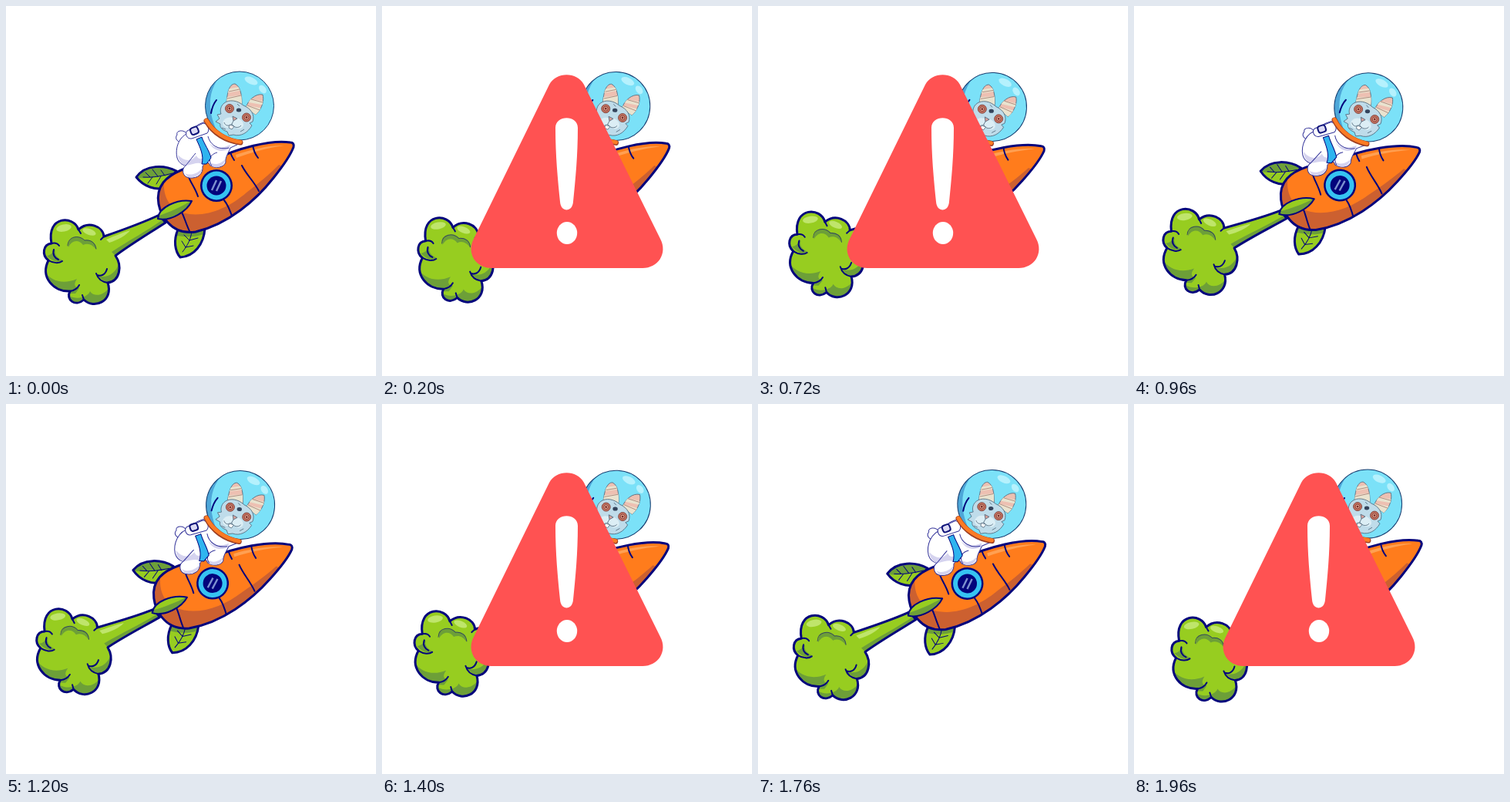
Animation of 480 by 480 pixels, one loop 2 s. Source, as an HTML page:

```html
<!DOCTYPE html>
<html lang="en">
<head>
<meta charset="utf-8">
<title>Carrot rocket</title>
<style>
  html, body { margin: 0; width: 100%; height: 100%; overflow: hidden; background: #fff; }
  svg { display: block; width: 100vw; height: 100vh; }
  .line { fill: none; stroke: #03047c; stroke-linecap: round; stroke-linejoin: round; }
  .w3 { stroke-width: 3; }
  .w2 { stroke-width: 2; }
  .w1 { stroke-width: 1; }
  .green { fill: #97cd20; }
  .shade { fill: #6d9f38; }
  .shine { fill: #bfe56b; }
  .fur { stroke: #4c6478; stroke-width: .8; stroke-linejoin: round; }
</style>
</head>
<body>
<svg viewBox="0 0 480 480">
  <defs>
    <path id="puff" d="M127 299 C126 286 107 278 94 290 C88 271 52 272 59 308 C48 309 46 323 55 330 C44 352 62 371 83 370 C77 381 90 391 101 381 C114 394 140 383 132 359 C148 357 151 337 142 324 C162 309 184 296 207 281 L199 271 C178 281 150 291 127 299Z"/>
    <path id="hull" d="M369 177 C344 173 301 184 263 202 C238 208 215 215 204 229 C191 246 199 269 210 281 C220 292 232 295 246 293 C289 283 325 251 347 223 C359 208 369 194 373 183 C374 179 372 177 369 177Z"/>
    <path id="leafA" d="M221 214 C206 206 181 205 169 222 C179 235 195 239 205 236Z"/>
    <path id="leafB" d="M223 290 C217 304 219 318 226 326 C244 325 257 309 258 288Z"/>
    <path id="nozzle" d="M197 276 C198 261 222 250 241 253 C235 266 214 280 197 276Z"/>
    <clipPath id="inPuff"><use href="#puff"/></clipPath>
    <clipPath id="inHull"><use href="#hull"/></clipPath>
    <clipPath id="inLeafA"><use href="#leafA"/></clipPath>
    <clipPath id="inLeafB"><use href="#leafB"/></clipPath>
    <clipPath id="inNozzle"><use href="#nozzle"/></clipPath>
    <clipPath id="inHelmet"><circle id="helmet" cx="303" cy="129.500" r="44.500"/></clipPath>
    <clipPath id="inEarA"><path id="earA" d="M286 125 C287 114 289 101 297 101 C304 104 306 115 306 127Z"/></clipPath>
    <clipPath id="inEarB"><path id="earB" d="M311 132 C314 122 324 113 333 115 C335 121 333 133 324 141Z"/></clipPath>
  </defs>

  <g id="ship">
    <!-- exhaust -->
    <use href="#puff" class="green"/>
    <g clip-path="url(#inPuff)">
      <path class="shade" d="M48 342 C57 357 74 362 92 354 C88 360 88 365 95 366 L90 373 H50Z"/>
      <path class="shade" d="M82 376 C93 382 107 377 109 370 C114 378 127 376 134 365 L140 392 H82Z"/>
      <path class="shade" d="M119 350 C132 354 143 346 147 333 L155 350 L133 362Z"/>
      <path class="shade" d="M137 319 C161 303 181 293 205 276 L215 286 L146 328Z"/>
      <path class="shade" d="M53 324 C59 331 69 334 74 330 C68 328 62 323 64 316 C61 320 57 324 53 324Z"/>
      <path class="shade" d="M81 313 C79 300 93 295 102 304 C110 302 117 308 117 316 C112 309 106 307 100 310 C94 302 85 304 81 313Z"/>
      <ellipse class="shine" cx="75" cy="288" rx="10" ry="4.500" transform="rotate(-12 75 288)"/>
      <ellipse class="shine" cx="108" cy="293" rx="9" ry="4" transform="rotate(20 108 293)"/>
      <path class="shine" d="M130 303 C139 299 151 294 161 291 C157 297 144 304 134 307Z"/>
    </g>
    <use href="#puff" class="line w3"/>
    <path class="line w2" d="M55 330 C62 334 69 334 73 331 M59 308 C63 307 67 308 69 311 M62 316 C60 322 63 327 68 329 M94 290 L97 295 M83 370 C89 369 93 366 95 362 M101 381 L99 375 M132 359 C124 358 119 353 117 347 M131 341 C129 349 123 351 118 349 M127 299 L123 303"/>
    <path class="line w1" stroke-opacity=".6" d="M80 311 C80 299 94 296 102 304 C110 303 116 307 117 315"/>

    <!-- leaves -->
    <use href="#leafA" class="green"/>
    <path class="shade" clip-path="url(#inLeafA)" d="M168 223 C182 224 202 221 222 218 V200 H168Z"/>
    <use href="#leafA" class="line w3"/>
    <path class="line w1" d="M178 222 C192 223 204 220 216 217 M187 222 L181 216 M197 221 L190 212 M206 220 L201 213 M190 222 L184 230 M201 221 L195 231"/>
    <use href="#leafB" class="green"/>
    <path class="shade" clip-path="url(#inLeafB)" d="M218 286 H262 V294 C247 300 234 301 218 297Z"/>
    <use href="#leafB" class="line w3"/>
    <path class="line w1" d="M229 319 C236 310 240 302 241 292 M233 313 L228 305 M238 304 L231 297 M233 313 L243 311 M238 304 L249 301"/>

    <!-- carrot -->
    <use href="#hull" fill="#ff7c1c"/>
    <g clip-path="url(#inHull)">
      <path fill="#cc6030" d="M205 226 C203 249 214 267 238 270 C263 273 290 261 312 242 C329 229 341 219 354 206 L365 210 L300 300 H190 V226Z"/>
      <path fill="#ffa052" d="M298 193 C318 186 343 180 361 181 C339 184 318 190 299 197Z"/>
      <path class="line w2" d="M320 180 C321 187 323 192 327 197 M291 190 C292 193 294 197 296 200 M306 207 C312 219 322 228 328 240 M283 252 C288 258 291 266 294 275 M236 219 C239 229 245 235 249 247 M222 258 C230 267 231 277 238 292"/>
    </g>
    <use href="#hull" class="line w3"/>

    <!-- window -->
    <circle cx="273" cy="233" r="21" fill="#03047c"/>
    <circle cx="273" cy="233" r="18.500" fill="#36c3f2"/>
    <circle cx="273" cy="233" r="12.500" fill="#03047c"/>
    <path fill="none" stroke="#7d91cf" stroke-width="2.400" d="M267 239 L273 226 M273 240 L279 227"/>

    <!-- nozzle -->
    <use href="#nozzle" class="green"/>
    <path class="shade" clip-path="url(#inNozzle)" d="M195 273 C212 268 226 261 242 252 L240 285 H195Z"/>
    <use href="#nozzle" class="line w2"/>

    <!-- suit -->
    <g stroke="#34349a" stroke-width="1" stroke-linejoin="round">
      <path fill="#fff" d="M231 177 C223 178 218 172 222 167 C220 162 230 159 235 166Z"/>
      <path fill="#fff" d="M239 164 C224 168 219 185 222 197 C224 203 228 206 233 207 C227 212 229 222 238 223 C249 224 256 218 255 208 C259 201 263 202 265 207 C272 211 282 210 285 203 C284 196 289 190 291 184 L304 178 L262 150 C252 151 244 156 239 164Z"/>
      <path fill="#d5d3ef" stroke="none" d="M223 193 C231 202 241 202 247 194 C250 201 257 199 261 192 L256 207 C252 201 244 205 234 207 C228 206 224 201 223 193Z M232 217 C240 221 249 217 254 211 C254 219 244 224 236 222Z M267 204 C274 207 280 203 284 199 C284 208 273 212 266 207Z M264 178 C272 187 281 184 291 180 L290 185 C281 190 270 189 264 178Z"/>
      <path fill="none" d="M246 191 C240 198 236 204 233 207 M267 207 C261 199 266 192 274 190 M262 169 C265 181 276 187 289 184"/>
      <path fill="#2fb4ef" stroke="#03047c" d="M247 173 L254 170 C257 179 264 188 266 197 L260 205 L254 205 C257 194 252 184 247 173Z"/>
      <path fill="#fff" d="M235 162 L256 152 C262 153 265 160 261 165 L241 172 C234 173 232 165 235 162Z"/>
      <rect x="239.500" y="157.500" width="10" height="9" rx="3" fill="#dcdaf3" stroke="#10147a" stroke-width="2" transform="rotate(-22 244 162)"/>
    </g>

    <!-- helmet -->
    <use href="#helmet" fill="#7be1f8"/>
    <g clip-path="url(#inHelmet)">
      <path fill="#4da6d8" d="M287 84 C262 101 258 133 276 167 L250 170 V84Z"/>
      <ellipse cx="318" cy="97" rx="9" ry="4.500" fill="#b5f1fd" transform="rotate(24 318 97)"/>
      <ellipse cx="333" cy="108" rx="6" ry="4" fill="#b5f1fd" transform="rotate(51 333 108)"/>
    </g>
    <use href="#helmet" fill="none" stroke="#173f72" stroke-width="1"/>
    <path class="line w2" d="M273 122 C269 127 267 133 266 139"/>

    <!-- rabbit -->
    <g class="fur">
      <use href="#earA" fill="#edc0b2"/>
      <use href="#earB" fill="#edc0b2"/>
      <g stroke="none">
        <path clip-path="url(#inEarA)" fill="#e9e3cf" d="M281 109 L307 104 V109 L281 114Z M281 119 L308 115 V128 H281Z"/>
        <path clip-path="url(#inEarB)" fill="#e9e3cf" d="M309 119 L337 124 V129 L309 124Z M309 128 L337 134 V143 H309Z"/>
      </g>
      <path fill="none" stroke="#a7796f" d="M289 111 L303 108 M287 120 L305 116 M318 121 L333 125 M313 129 L329 135"/>
      <path fill="#bfdcea" d="M283 126 C289 121 300 122 308 129 C318 133 323 141 320 150 L316 152 L319 155 C314 164 305 170 295 167 L289 168 L287 163 C281 161 277 158 278 153 L272 150 L277 146 L274 141 L279 140 C277 135 279 129 283 126Z"/>
      <path fill="#dceef5" stroke="none" d="M293 145 C286 143 279 149 282 155 C286 160 292 158 294 154 C298 160 306 161 308 155 C309 148 300 144 293 145Z"/>
      <g fill="#c4705f" stroke="#77382f">
        <circle cx="290" cy="133" r="5.500"/>
        <circle cx="312" cy="144.500" r="5.500"/>
        <g fill="#e6a08b"><circle cx="290" cy="133" r="3"/><circle cx="312" cy="144.500" r="3"/></g>
        <g fill="#732f2d" stroke="none"><circle cx="290" cy="133" r="1.400"/><circle cx="312" cy="144.500" r="1.400"/></g>
      </g>
      <ellipse cx="302" cy="135" rx="3.200" ry="2.500" fill="#34445c" stroke="none"/>
      <path fill="#d9a09a" d="M294 143 L300 146 L295 149Z"/>
      <path fill="none" d="M295 149 L293 153 C289 157 284 155 283 151 M293 153 C295 158 302 159 305 155 M300 127 L303 130 M280 158 L285 160 M304 163 L309 160"/>
      <path fill="#fff" d="M290 154 L296 156 L293 160 L289 158Z"/>
    </g>

    <!-- collar -->
    <path fill="none" stroke="#9d3e22" stroke-width="7" stroke-linecap="round" d="M260 149 C269 165 286 175 304 177"/>
    <path fill="none" stroke="#fb7b24" stroke-width="5" stroke-linecap="round" d="M260 148.500 C269 164 286 174 304 176.500"/>
  </g>

  <!-- warning -->
  <g id="alert">
    <path fill="#ff5252" d="M217 102 C226 85 253 85 262 102 L361 302 C371 321 358 340 338 340 H142 C122 340 109 321 119 302Z"/>
    <path fill="#fff" d="M225 158 C225 141 254 141 254 158 C254 194 251 225 248 254 C247 268 232 268 231 254 C228 225 225 194 225 158Z"/>
    <ellipse cx="240" cy="294.500" rx="13.200" ry="14.500" fill="#fff"/>
  </g>
</svg>
<script>
  const LOOP = 2000, STEP = 40, BLINK = 400, TILT = 4.2;
  const ship = document.getElementById('ship');
  const alertSign = document.getElementById('alert');

  function draw(now) {
    const t = Math.floor((now % LOOP) / STEP) * STEP;
    const swing = 1 - Math.abs(1 - t / (LOOP / 2));
    ship.setAttribute('transform', `rotate(${TILT * swing} 277 149)`);
    alertSign.style.display = t % BLINK >= BLINK / 2 ? '' : 'none';
  }

  const start = performance.now();
  function tick() {
    draw(performance.now() - start);
    requestAnimationFrame(tick);
  }
  tick();
</script>
</body>
</html>
```
